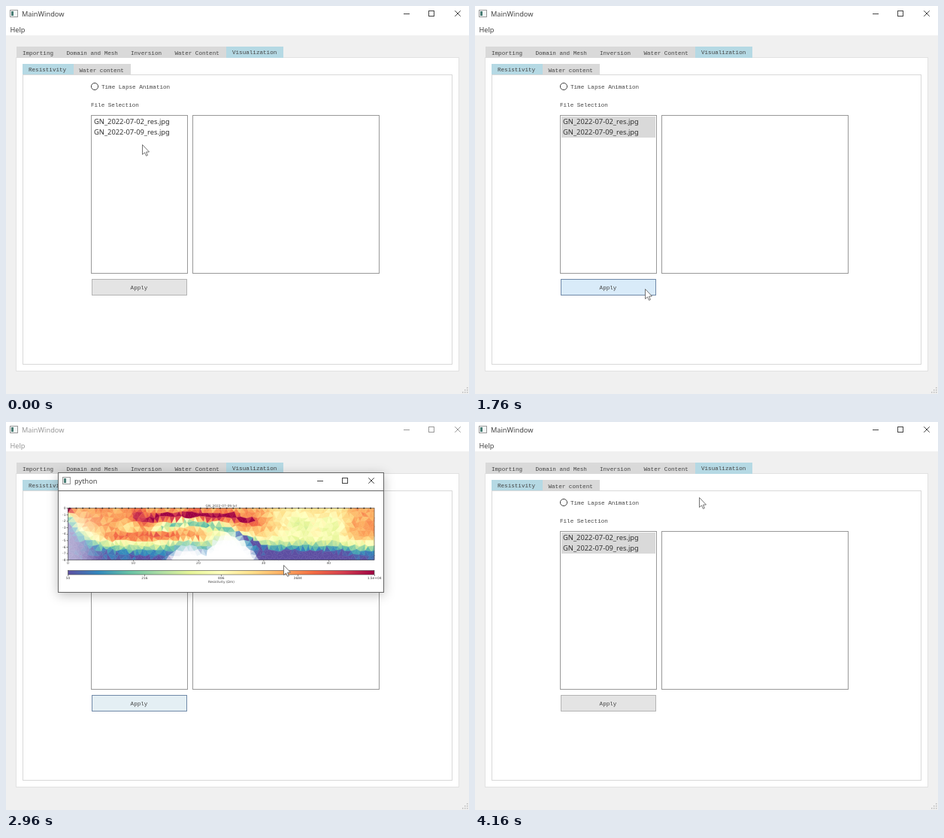
These frames come from a looping animation (616x516 px, 4.24 s). An HTML page with a canvas:

```html
<!DOCTYPE html>
<html>
<head>
<meta charset="utf-8">
<style>
html, body { margin: 0; width: 616px; height: 516px; overflow: hidden; }
canvas { display: block; }
</style>
</head>
<body>
<canvas id="stage" width="616" height="516"></canvas>
<script>
const LOOP = 4240, STEP = 80;
const UI = '9.2px "Noto Sans", "Open Sans", sans-serif';
const FILE = '9.35px "Noto Sans", "Open Sans", sans-serif';
const MONO = '7.6px "Liberation Mono", monospace';
const TINY = '4.4px "DejaVu Sans", sans-serif';
const INK = '#444', FADED = '#999', BLUE = '#b5d9e4', GREY = '#d9d9d9';
const SPECTRAL = ['5e4fa2', '3288bd', '66c2a5', 'abdda4', 'e6f598', 'ffffbf',
  'fee08b', 'fdae61', 'f46d43', 'd53e4f', '9e0142']
  .map(h => [0, 2, 4].map(i => parseInt(h.slice(i, i + 2), 16)));

const stage = document.getElementById('stage').getContext('2d');
let g = stage;

// drawing helpers
function box(x, y, w, h, fill, line) {
  if (fill) { g.fillStyle = fill; g.fillRect(x, y, w, h); }
  if (line) { g.strokeStyle = line; g.lineWidth = 1; g.strokeRect(x + .5, y + .5, w - 1, h - 1); }
}
function text(s, x, y, font = MONO, color = INK, align = 'left') {
  g.font = font; g.fillStyle = color; g.textAlign = align;
  g.fillText(s, x, y);
}
function path(points, line, fill, width = 1) {
  g.beginPath();
  points.forEach(p => g.lineTo(...p));
  g.closePath();
  if (fill) { g.fillStyle = fill; g.fill(); }
  g.strokeStyle = line; g.lineWidth = width; g.stroke();
}

// shapes the underground field is built from
const bump = (x, c, r) => Math.exp(-(((x - c) / r) ** 2));
const spot = (x, y, cx, cy, rx, ry) => bump(x, cx, rx) * bump(y, cy, ry);
const rise = x => 1 / (1 + Math.exp(-x));
const span = (x, a, b) => rise((x - a) / 5) * rise((b - x) / 5);
const dome = (x, y, c, top, r) => rise((y - top - (183 - top) * ((x - c) / r) ** 2) / 2.5);

// resistivity from 0 to 1; the two dates share the layers and differ below them
function resistivity(x, y, later) {
  const floor = 166 - 48 * Math.exp((82 - x) / 20) - 7 * bump(x, 240, 25) + (later
    ? -9 * bump(x, 310, 35)
    : 28 * bump(x, 286, 10) - 10 * bump(x, 325, 20) + 17 * bump(x, 400, 26));
  const red = 124 + .0012 * (x - 250) ** 2 + 1.5 * Math.sin(x / 7);
  const blue = 135 + (later ? .0035 : .0024) * (x - 245) ** 2 + Math.sin(x / 8);
  let v = .71 - .14 * span(x, 350, 455) - .72 * rise((y - floor) / 5.5);
  v += .34 * span(x, later ? 180 : 195, 335) * bump(y, red, 4.5);
  v -= .48 * span(x, 200, 340) * bump(y, blue, 5);
  v += .2 * span(x, later ? 135 : 200, 275) * bump(y, 153, 5);
  v += .9 * spot(x, y, 83, 115, 5, 5) + .22 * spot(x, y, 175, 123, 9, 8);
  v -= .18 * spot(x, y, 392, 138, 16, 14) + .15 * spot(x, y, 432, 140, 14, 14);
  return later
    ? v - .18 * spot(x, y, 164, 139, 10, 7) - .25 * spot(x, y, 278, 152, 14, 9)
    : v - .18 * spot(x, y, 125, 138, 28, 14) + .15 * spot(x, y, 158, 150, 14, 8)
      + .2 * spot(x, y, 345, 144, 14, 8) + .14 * spot(x, y, 462, 140, 10, 10);
}

// how far missing coverage bleaches the section
function bleach(x, y, later) {
  return dome(x, y, 243, 165, 28) + (later
    ? dome(x, y, 297, 149, 37) + .55 * rise((112 - x) / 9) * rise((y - 125) / 5)
    : dome(x, y, 318, 161, 28) + .8 * spot(x, y, 98, 150, 14, 15));
}

function shade(v, white) {
  const p = Math.min(.9999, Math.max(0, v)) * 10, i = Math.floor(p);
  const rgb = SPECTRAL[i].map((c, j) => {
    const mix = c + (SPECTRAL[i + 1][j] - c) * (p - i);
    return Math.round(mix + (255 - mix) * Math.min(1, white));
  });
  return `rgb(${rgb})`;
}

function drawMesh(later) {
  let seed = 4711;
  const rnd = () => (seed = (seed * 16807) % 2147483647) / 2147483647;
  const cols = 60, rows = 11;
  const node = (i, j) => {
    const inner = i % cols && j % rows;
    const dx = i % cols ? (j % 2) * .5 + (rnd() - .5) * .6 : 0;
    const dy = inner ? (rnd() - .5) * .6 : 0;
    return [82.5 + 407.5 * Math.min(1, (i + dx) / cols), 114.5 + 69 * (j + dy) / rows];
  };
  const grid = Array.from({ length: rows + 1 }, (_, j) =>
    Array.from({ length: cols + 1 }, (_, i) => node(i, j)));
  const tri = (...pts) => {
    const [x, y] = [0, 1].map(k => (pts[0][k] + pts[1][k] + pts[2][k]) / 3);
    const color = shade(resistivity(x, y, later) + (rnd() - .5) * .1, bleach(x, y, later));
    path(pts, color, color, .5);
  };
  for (let j = 0; j < rows; j++) for (let i = 0; i < cols; i++) {
    const a = grid[j][i], b = grid[j][i + 1], c = grid[j + 1][i + 1], d = grid[j + 1][i];
    if (j % 2) { tri(a, b, c); tri(a, c, d); }
    else { tri(a, b, d); tri(b, c, d); }
  }
}

function drawPlot(later) {
  drawMesh(later);
  g.strokeStyle = INK; g.lineWidth = .6;
  g.strokeRect(82.5, 114.5, 407.5, 69);
  for (let x = 84; x < 490; x += 8.7) box(x, 113.8, 1.6, 1.6, '#222');
  text(`GN_2022-07-0${later ? 9 : 2}.txt`, 286.5, 112.5, TINY, INK, 'center');
  for (let i = 0; i < 9; i++) {
    const y = 114.5 + i * 8.6;
    text(-i || 0, 79.5, y + 1.5, TINY, INK, 'right');
    box(80.5, y, 2, .6, INK);
  }
  for (let i = 0; i < 5; i++) {
    const x = 82.5 + i * 86.7;
    box(x, 183.5, .6, 2, INK);
    text(i * 10, x, 189.3, TINY, INK, 'center');
  }
  const bar = g.createLinearGradient(82, 0, 490, 0);
  SPECTRAL.forEach((c, i) => bar.addColorStop(i / 10, `rgb(${c})`));
  g.fillStyle = bar;
  g.fillRect(82.5, 197.5, 407.5, 5.5);
  g.strokeRect(82.5, 197.5, 407.5, 5.5);
  ['50', '216', '886', '3684', '1.5e+04'].forEach((s, i) => {
    const x = 82.5 + i * 101.9;
    box(x, 203, .6, 2, INK);
    text(s, x, 208.5, TINY, INK, 'center');
  });
  text('Resistivity (Ωm)', 286.5, 214.3, TINY, INK, 'center');
}

const plots = [true, false].map(later => {
  const c = document.createElement('canvas');
  c.width = 616; c.height = 516;
  g = c.getContext('2d');
  drawPlot(later);
  return c;
});
g = stage;

function titleBar(x, y, title, right, color) {
  box(x, y - 5, 11, 10, '#f4f7f7', '#999');
  box(x + 2, y - 3, 3, 6, '#4a7d74');
  text(title, x + 16, y + 3.5, UI, color);
  box(right - 72, y, 8, 1, color);
  box(right - 39, y - 4, 8, 8, null, color);
  for (const s of [-3.5, 3.5]) path([[right - s, y - 3.5], [right + s, y + 3.5]], color);
}

function drawList(t) {
  box(113, 145, 129, 211, '#fff', '#999');
  box(248, 145, 249, 211, '#fff', '#999');
  const fill = t >= 1520 ? GREY : '#cce8ff';
  if (t >= 480) box(115, 147, 125, 14, fill);
  if (t >= 320) box(115, 161, 125, 14, t < 400 ? '#e5f3ff' : fill);
  if (t >= 480 && t < 1520) {
    g.setLineDash([1, 1]);
    box(115, 146, 125, 15, null, '#555');
    g.setLineDash([]);
  }
  text('GN_2022-07-02_res.jpg', 117, 157, FILE, '#333');
  text('GN_2022-07-09_res.jpg', 117, 171, FILE, '#333');
}

function drawButton(t) {
  const hot = t >= 1440 && t < 3200, pressed = t >= 1600 && t < 2080;
  const fill = !hot ? '#e4e4e4' : pressed ? '#d9ebf9' : t < 2640 ? '#e5f1fb' : '#e4eff4';
  box(114, 363, 127, 22, fill, hot ? '#7089a8' : '#b4b4b4');
  text('Apply', 177, 377, MONO, INK, 'center');
}

function drawMain(t, active) {
  const color = active ? INK : FADED;
  box(0, 0, 616, 516, '#f0f0f0');
  box(0, 0, 616, 39, '#fff');
  titleBar(5, 10, 'MainWindow', 601, color);
  text('Help', 5.5, 34.5, UI, color);

  box(13, 68, 590, 418, '#fff', '#e2e2e2');
  box(14, 54, 279, 15, GREY);
  box(293, 54, 76, 15, BLUE);
  text('Importing', 22, 65);
  text('Domain and Mesh', 80.5, 65);
  text('Inversion', 166, 65);
  text('Water Content', 224.5, 65);
  text('Visualization', 301, 64);

  box(22, 91, 572, 386, '#fff', GREY);
  box(22, 77, 68, 14, BLUE);
  box(90, 77, 76, 14, GREY);
  text('Resistivity', 30, 87);
  text('Water content', 97.5, 88);

  g.beginPath();
  g.arc(118, 107, 4.6, 0, 7);
  g.strokeStyle = INK; g.lineWidth = 1; g.stroke();
  text('Time Lapse Animation', 127, 110);
  text('File Selection', 113, 133.5);
  drawList(t);
  drawButton(t);
  for (let i = 0; i < 3; i++) for (let j = 0; j <= i; j++)
    box(613 - j * 3, 507 + i * 3, 1.5, 1.5, '#bbb');
}

function drawDialog(plot) {
  g.save();
  g.shadowColor = 'rgba(0,0,0,.25)'; g.shadowBlur = 14; g.shadowOffsetY = 3;
  box(69, 67, 434, 160, '#fff');
  g.restore();
  box(69, 67, 434, 160, null, '#666');
  box(69, 91, 434, 1, '#666');
  titleBar(75, 78, 'python', 486, INK);
  g.drawImage(plot, 0, 0);
}

// time, x, y
const pointer = [[0, 181, 184], [80, 182, 189], [200, 182, 189], [560, 169, 151], [840, 169, 151],
  [1360, 222, 364], [1520, 226, 376], [2600, 226, 376], [2960, 369, 190], [3200, 486, 76],
  [3440, 514, 70], [3600, 491, 68], [3760, 486, 76], [4160, 298, 100]];
const arrow = [[0, 0], [0, 13], [3, 10.4], [5, 14.8], [6.9, 14], [5, 9.7], [9, 9.5]];

function drawPointer(t) {
  const next = Math.max(1, pointer.findIndex(p => p[0] >= t));
  const [a, b] = [pointer[next - 1], pointer[next]];
  const k = (t - a[0]) / (b[0] - a[0]);
  const [x, y] = [1, 2].map(i => a[i] + (b[i] - a[i]) * k + .5);
  path(arrow.map(([dx, dy]) => [x + dx, y + dy]), '#666', '#fff', .9);
}

function frame(now) {
  const t = Math.floor(now % LOOP / STEP) * STEP;
  const open = t >= 2160 && t < 3760;
  drawMain(t, !open);
  if (open) drawDialog(plots[t < 3280 ? 0 : 1]);
  drawPointer(t);
  requestAnimationFrame(frame);
}
frame(0);
</script>
</body>
</html>
```
